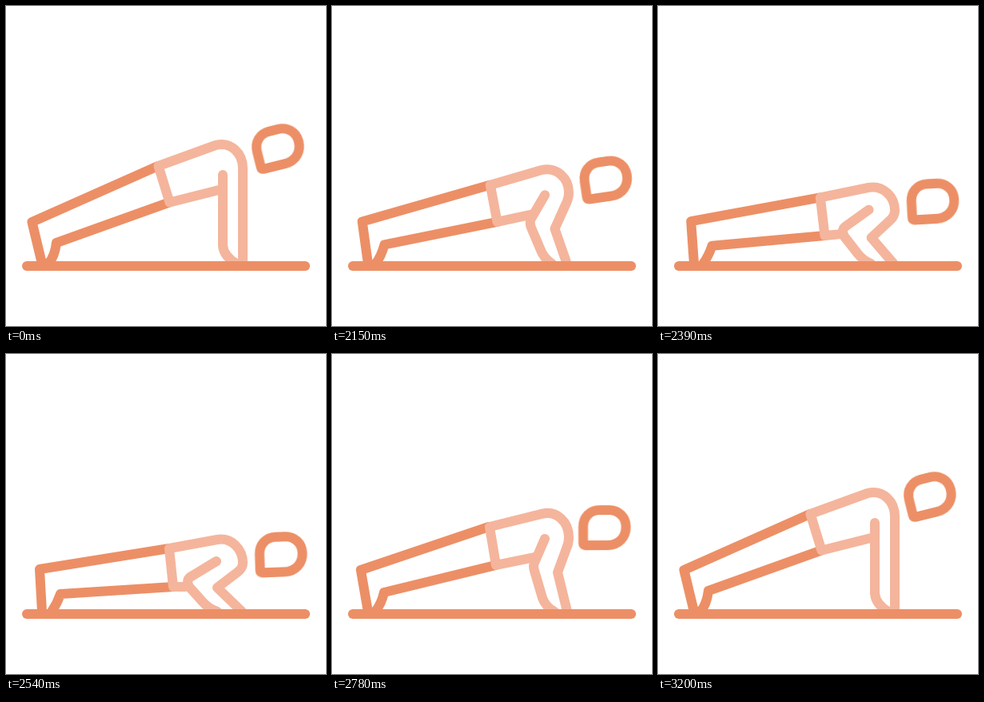
Animation of 400x400 px, one loop 3230 ms. Source, as an HTML page without scripts:

```html
<!DOCTYPE html>
<html lang="en">
<head>
<meta charset="utf-8">
<title>Push-up</title>
<style>
  :root {
    --dark: #ec8f66;
    --light: #f4b59c;
    /* each stroke of the push-up is eased in two halves */
    --drop: cubic-bezier(.363, .089, .621, .596);
    --land: cubic-bezier(.25, .549, .559, 1);
    --push: cubic-bezier(.407, 0, .69, .562);
    --lock: cubic-bezier(.296, .55, .61, 1);
  }
  html, body { margin: 0; width: 100%; height: 100%; overflow: hidden; background: #fff; }
  svg { display: block; width: 100%; height: 100%; }
  path {
    fill: none;
    stroke: var(--dark);
    stroke-width: 12;
    stroke-linecap: round;
    stroke-linejoin: round;
    animation: 3230ms linear infinite;
  }
  .shirt { stroke: var(--light); }
  #legs { animation-name: legs; }
  #torso { animation-name: torso; }
  #arm { animation-name: arm; }
  #head { animation-name: head; }

  @keyframes legs {
    0%, 62.7% {
      d: path("M190 200L32.5 270L45 322M204 245.5L63 296Q61 313 53 322");
      animation-timing-function: var(--drop);
    }
    70.28% {
      d: path("M199 229L39 269.5L45 322M207 275.5L66 299Q62 312 55 322");
      animation-timing-function: var(--land);
    }
    78.64%, 79.1% {
      d: path("M204 243L42 269L45 322M209 291L68 300Q64 312 57 322");
      animation-timing-function: var(--push);
    }
    86.07% {
      d: path("M196 216L36 270L45 322M205 264L65 298Q62 312 54 322");
      animation-timing-function: var(--lock);
    }
    91.18%, to { d: path("M190 200L32.5 270L45 322M204 245.5L63 296Q61 313 53 322"); }
  }
  @keyframes torso {
    0%, 62.7% {
      d: path("M270 229L204.5 245.5L190.5 200L262 174C281 169 296 184 296 203Q296 212 296 220L296 258L296 322");
      animation-timing-function: var(--drop);
    }
    70.28% {
      d: path("M243 268L207 275.5L199.5 229L262 212C281 208 296 222 296 240Q296 247 291 255L274.5 283L293 322");
      animation-timing-function: var(--land);
    }
    78.64%, 79.1% {
      d: path("M224 291L209 291L204 243L264 232C282 229 296 244 296 261Q296 268 289 273L264 292L295 322");
      animation-timing-function: var(--push);
    }
    86.07% {
      d: path("M254 254L205 264L197 216L262 200C281 195 296 210 296 229Q296 237 293 243L282 273L294 322");
      animation-timing-function: var(--lock);
    }
    91.18%, to { d: path("M270 229L204.5 245.5L190.5 200L262 174C281 169 296 184 296 203Q296 212 296 220L296 258L296 322"); }
  }
  @keyframes arm {
    0%, 62.7% {
      d: path("M271 211L271 255Q271 262 271 268L271 299Q272 313 288 322");
      animation-timing-function: var(--drop);
    }
    70.28% {
      d: path("M265 242L244 268Q241 272 244 279L258 305Q263 316 272 322");
      animation-timing-function: var(--land);
    }
    78.64%, 79.1% {
      d: path("M263 259L230 279Q225 283 229 291L246 310Q253 318 264 322");
      animation-timing-function: var(--push);
    }
    86.07% {
      d: path("M266 231L253 261Q251 265 253 271L263 305Q267 316 278 322");
      animation-timing-function: var(--lock);
    }
    91.18%, to { d: path("M271 211L271 255Q271 262 271 268L271 299Q272 313 288 322"); }
  }
  /* the head lags behind, then overshoots and settles */
  @keyframes head {
    0%, 62.7% {
      transform: translate(339.8px, 176.7px) rotate(-14deg);
      animation-timing-function: var(--drop);
    }
    70.28% {
      transform: translate(342.6px, 225.3px) rotate(-7deg);
      animation-timing-function: var(--land);
    }
    78.64%, 79.1% {
      transform: translate(343.5px, 250.5px) rotate(-2deg);
      animation-timing-function: var(--push);
    }
    86.07% {
      transform: translate(340.5px, 217.5px) rotate(0deg);
      animation-timing-function: cubic-bezier(.3, .4, .7, .92);
    }
    89.78% {
      transform: translate(338px, 174.5px) rotate(-18deg);
      animation-timing-function: ease-out;
    }
    92.88% {
      transform: translate(336px, 169px) rotate(-22deg);
      animation-timing-function: ease-in-out;
    }
    99.07%, to { transform: translate(339.8px, 176.7px) rotate(-14deg); }
  }
</style>
</head>
<body>
<svg viewBox="0 0 400 400">
  <path id="legs" d="M190 200L32.5 270L45 322M204 245.5L63 296Q61 313 53 322"/>
  <path id="torso" class="shirt" d="M270 229L204.5 245.5L190.5 200L262 174C281 169 296 184 296 203Q296 212 296 220L296 258L296 322"/>
  <path id="arm" class="shirt" d="M271 211L271 255Q271 262 271 268L271 299Q272 313 288 322"/>
  <path id="head" d="M-26.5 19.5V-1C-26.5-13-18-22-6-22H6C18-22 27-13 27-1C27 12 18 22 4 22H-24Q-26.5 22-26.5 19.5Z"/>
  <path d="M26 325H374"/>
</svg>
</body>
</html>
```
